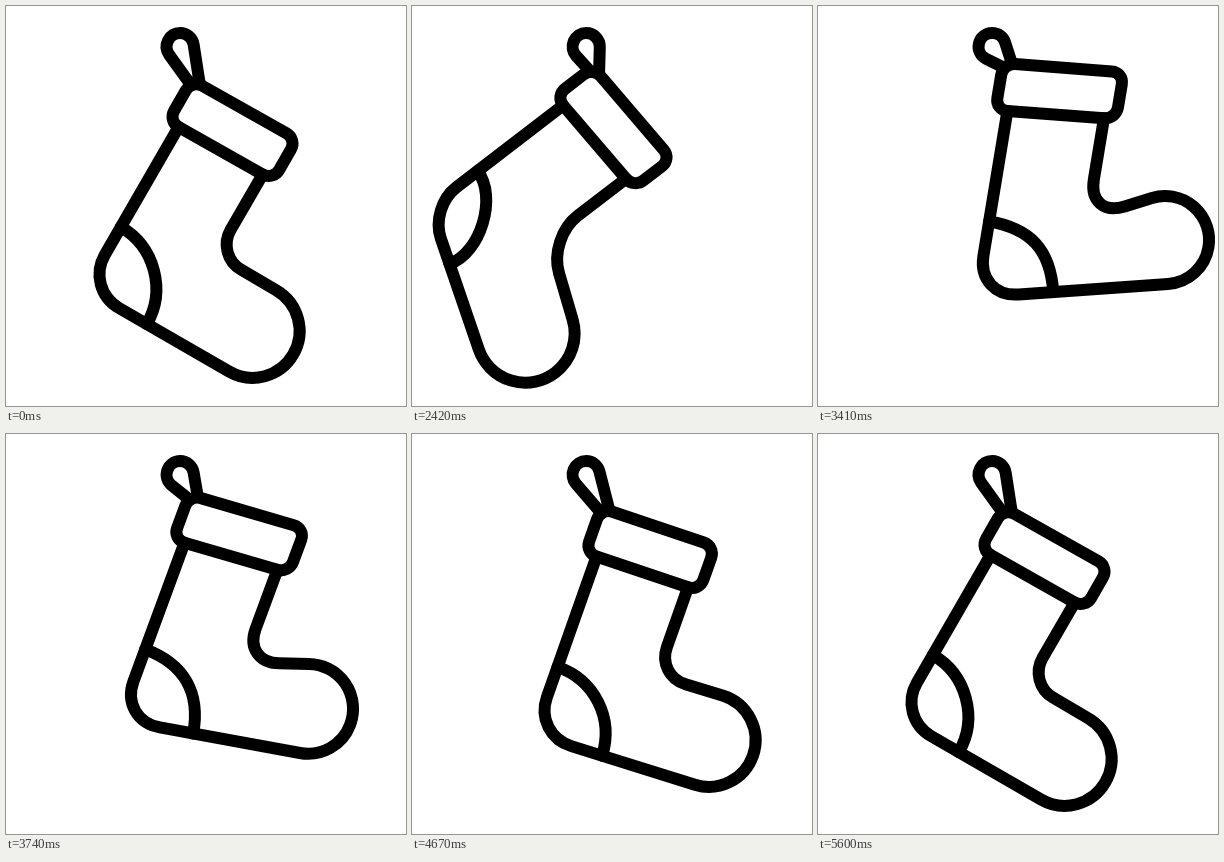
Write an HTML page that moves like this. It is 400 px wide and 400 px high and loops after 5.63 s.

```html
<!DOCTYPE html>
<html lang="en">
<head>
<meta charset="utf-8">
<title>Swinging stocking</title>
<style>
  html, body { margin: 0; width: 100%; height: 100%; overflow: hidden; background: #fff; }
  svg { display: block; width: 100vw; height: 100vh; }
  path { fill: none; stroke: #000; stroke-width: 12; stroke-linejoin: round; stroke-linecap: round; }
</style>
</head>
<body>
<svg viewBox="0 0 400 400">
  <path id="loop"/>
  <g id="body">
    <path id="cuff"/>
    <path id="foot"/>
    <path id="patch"/>
  </g>
</svg>
<script>
const LOOP = 5630, START = 2030, END = 5600, STEP = 30;
const HOOK = [174.2, 40.7], HOOK_R = 13.6;
const LEG_L = 5, LEG_R = 101.5, CUFF_H = 47.5, ANKLE_Y = 139.5;

// Turning points of the fading swing; bend is how far the toe trails behind
const REST = { angle: 30, x: 192, y: 77.4, bend: 0 };
const SWING = [
  { at: 2000, ...REST },
  { at: 2630, angle: 60, x: 183.5, y: 63, bend: 1 },
  { at: 3450, angle: 9.1, x: 192.2, y: 57.7, bend: -1 },
  { at: 4190, angle: 42.4, x: 185.9, y: 72.8, bend: -0.06 },
  { at: 4740, angle: 18.5, x: 196, y: 76.3, bend: -0.1 },
  { at: 5240, angle: 33, x: 190.7, y: 77, bend: 0 },
  { at: END, ...REST }
];

const el = id => document.getElementById(id);
const pt = p => p.map(n => n.toFixed(2)).join(" ");
const lerp = (a, b, k) => a + (b - a) * k;
const mix = (a, b, k) => a.map((n, i) => lerp(n, b[i], k));
const toward = (a, b, len) => mix(a, b, len / Math.hypot(b[0] - a[0], b[1] - a[1]));

// Point where a line from p touches the circle
function touch(p, c, r, side) {
  const dx = c[0] - p[0], dy = c[1] - p[1], d = Math.hypot(dx, dy);
  const a = Math.atan2(dy, dx) + side * Math.asin(r / d);
  const len = Math.sqrt(d * d - r * r);
  return [p[0] + len * Math.cos(a), p[1] + len * Math.sin(a)];
}

// Rounded corner at c, coming from a and leaving to b
function round(a, c, b, len, cmd = "L") {
  const s = toward(c, a, len), e = toward(c, b, len);
  return `${cmd}${pt(s)}C${pt(mix(s, c, 0.56))} ${pt(mix(e, c, 0.56))} ${pt(e)}`;
}

const arc = (r, sweep, p) => `A${r} ${r} 0 0 ${sweep} ${pt(p)}`;

function poseAt(t) {
  if (t < START || t >= END) return REST;
  const i = SWING.findIndex(s => s.at > t), a = SWING[i - 1], b = SWING[i];
  const k = (1 - Math.cos(Math.PI * (t - a.at) / (b.at - a.at))) / 2;
  return {
    angle: lerp(a.angle, b.angle, k),
    x: lerp(a.x, b.x, k),
    y: lerp(a.y, b.y, k),
    bend: lerp(a.bend, b.bend, k)
  };
}

function drawLoop({ x, y, angle }) {
  const a = angle * Math.PI / 180, cos = Math.cos(a), sin = Math.sin(a);
  const left = [x - 5 * (cos + sin), y + 5 * (cos - sin)];
  const right = [x + 1.5, y - 1];
  el("loop").setAttribute("d", `M${pt(left)}L${pt(touch(left, HOOK, HOOK_R, -1))}` +
    arc(HOOK_R, 1, [HOOK[0], HOOK[1] - HOOK_R]) +
    arc(HOOK_R, 1, touch(right, HOOK, HOOK_R, 1)) + `L${pt(right)}`);
}

function drawBody({ x, y, angle, bend }) {
  el("body").setAttribute("transform", `translate(${x} ${y}) rotate(${angle})`);

  const turn = angle - REST.angle, lift = REST.y - y;
  const tilt = (u, v) => [u, v - (0.01 + 0.004 * lift) * u];
  const box = [tilt(-7, 0), tilt(LEG_R + 12, 0), tilt(LEG_R + 12, CUFF_H), tilt(-7, CUFF_H)];
  el("cuff").setAttribute("d", box.map((c, i) =>
    round(box[(i + 3) % 4], c, box[(i + 1) % 4], 12, i ? "L" : "M")).join("") + "Z");

  const topL = tilt(LEG_L, CUFF_H), topR = tilt(LEG_R, CUFF_H);
  const heel = [LEG_L, Math.min(236, 234 - 0.85 * turn)], ankle = [LEG_R, ANKLE_Y];
  const toe = [171 - 10.7 * bend, 187 + 38.8 * bend], r = 47 + 3 * bend;
  const sole = touch(heel, toe, r, 1), instep = touch(ankle, toe, r, -1);
  const size = 71 - 0.3 * Math.max(0, turn) - 6 * bend;
  el("foot").setAttribute("d", `M${pt(topL)}` + round(topL, heel, sole, size * 0.55) +
    `L${pt(sole)}` + arc(r, 0, [toe[0] + r, toe[1]]) + arc(r, 0, instep) +
    round(instep, ankle, topR, 29 + 10 * Math.abs(bend)) + `L${pt(topR)}`);

  const from = [LEG_L, heel[1] - size], to = toward(heel, sole, size);
  const c1 = [LEG_L + 0.55 * size, from[1]];
  const c2 = [to[0] + 0.55 * (to[1] - heel[1]), to[1] - 0.55 * (to[0] - LEG_L)];
  el("patch").setAttribute("d", `M${pt(from)}C${pt(c1)} ${pt(c2)} ${pt(to)}`);
}

function tick() {
  const t = performance.now() % LOOP;
  const pose = poseAt(START + STEP * Math.floor((t - START) / STEP));
  drawLoop(pose);
  drawBody(pose);
  requestAnimationFrame(tick);
}
tick();
</script>
</body>
</html>
```
